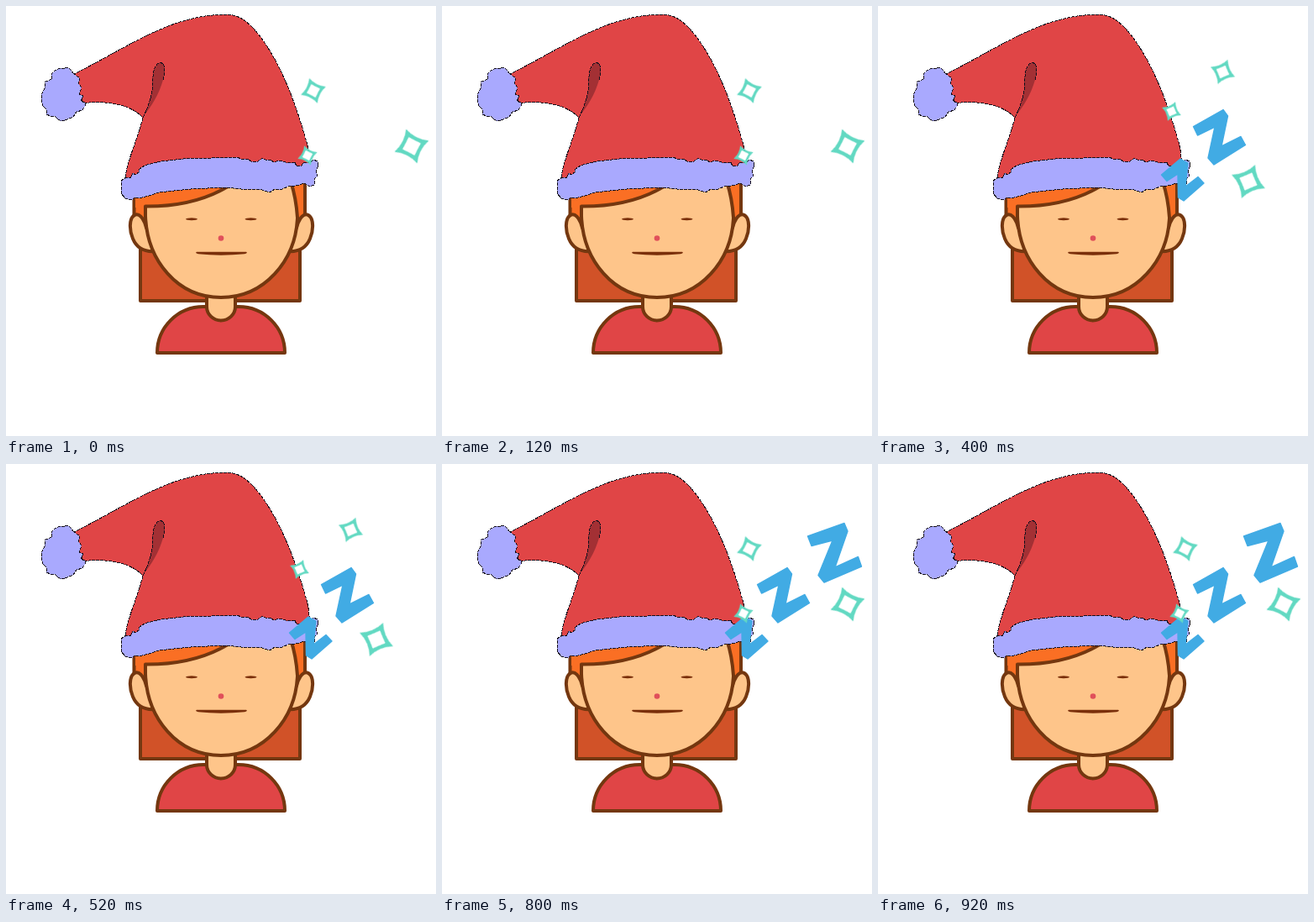
These frames come from a looping animation (512 px wide and 512 px high, 1000 ms). An HTML page:

```html
<!DOCTYPE html>
<html lang="en">
<head>
<meta charset="utf-8">
<title>Sleepy winter nap</title>
<style>
  html, body { margin: 0; width: 100%; height: 100%; overflow: hidden; background: #fff; }
  svg { display: block; width: 100vw; height: 100vh; }

  .line { stroke: #74370f; stroke-width: 4; stroke-linejoin: round; stroke-linecap: round; }
  .edge { stroke: #15101c; stroke-width: 1; stroke-dasharray: 4 1; shape-rendering: crispEdges; }
  .skin { fill: #fec58a; }
  .hair { fill: #fa6f24; }
  .back { fill: #d15228; }
  .red  { fill: #e04546; }
  .fur  { fill: #a9a9fe; }
  .dark { fill: #7a2f0a; }

  .z { fill: #41abe4; stroke: #41abe4; stroke-width: 1.4; stroke-linejoin: round; animation: 1s step-end infinite; }
  .z1 { animation-name: first; }
  .z2 { animation-name: second; }
  .z3 { animation-name: third; }
  @keyframes first  { 0% { opacity: 0 } 20%, 100% { opacity: 1 } }
  @keyframes second { 0% { opacity: 0 } 40%, 100% { opacity: 1 } }
  @keyframes third  { 0% { opacity: 0 } 60%, 100% { opacity: 1 } }

  /* each star swings between three poses: a, b, c, b, a */
  .star { animation: swing 1s step-end infinite; }
  .big   { --a: 483px, 167px; --b: 469px, 189px; --c: 441px, 209px; --s: 1; }
  .mid   { --a: 366px, 101px; --b: 383px, 86.5px; --c: 410.5px, 78.5px; --s: .73; }
  .small { --a: 359px, 178px; --b: 349px, 156.5px; --c: 349.5px, 125.5px; --s: .57; }
  @keyframes swing {
    0%, 80%, 100% { transform: translate(var(--a)) rotate(-18deg) scale(var(--s)); }
    20%, 60%      { transform: translate(var(--b)) scale(var(--s)); }
    40%           { transform: translate(var(--c)) rotate(22deg) scale(var(--s)); }
  }
</style>
</head>
<body>
<svg viewBox="0 0 512 512" fill="none">
  <defs>
    <g id="star">
      <path fill="#62d9c2" d="M0-21.500Q6.500-6.500 21.500 0Q6.500 6.500 0 21.500Q-6.500 6.500-21.500 0Q-6.500-6.500 0-21.500Z"/>
      <path fill="#fff" d="M0-11.500Q5.500-5.500 11.500 0Q5.500 5.500 0 11.500Q-5.500 5.500-11.500 0Q-5.500-5.500 0-11.500Z"/>
    </g>
  </defs>

  <!-- body -->
  <path class="line back" d="M160 270H350V351H160Z"/>
  <path class="line red" d="M180 413A55 55 0 0 1 235 358H277A55 55 0 0 1 332 413Z"/>
  <path class="line skin" d="M239 340V358A17 16.500 0 0 0 273 358V340Z"/>

  <!-- head -->
  <path class="line hair" d="M152.500 210V262H172V210Z"/>
  <path class="line hair" d="M338 205H356V262H338Z"/>
  <path class="line skin" d="M167 264C164 252 158 246 153 249C146 253 147 268 151 277C156 289 166 293 178 292"/>
  <path class="line skin" d="M346 264C349 252 355 246 360 249C367 253 366 268 362 277C357 289 347 293 335 292"/>
  <path class="line skin" d="M166 238V250C168 303 204 347 256 347C308 347 345 303 347 252C346 237 344 224 339 209L262 205Z"/>
  <path class="hair" d="M154 208H264V215Q224 239 166 238.500V240H154Z"/>
  <path class="line" d="M166 250V238.500Q224 239 264 215"/>
  <ellipse class="dark" cx="221" cy="253.700" rx="7" ry="1.500"/>
  <ellipse class="dark" cx="291.500" cy="253.700" rx="7" ry="1.500"/>
  <circle fill="#e0505a" cx="256" cy="276.500" r="3.300"/>
  <path class="dark" d="M227 292.700H286Q288.500 294 284 295.300Q256 298 229 295.300Q224.500 294 227 292.700Z"/>

  <!-- hat -->
  <path class="edge red" d="M80 81.500C112 66 145 45 181 29C208 17 238 9 267 10.500C285 12 301 32 314 53C335 88 347 125 355 152C360 168 362 178 361 194L250 205L142 206C143 187 155 164 163 133C151 120 128 112 93 115.500L82 100Z"/>
  <path fill="#a33034" d="M164 131C173 113 175 99 175 84C176 73 179 68 184 67.500C190 68 189.500 79 187 88C182 106 172 121 164 131Z"/>
  <path class="edge" d="M163 133C173 113 175 99 175 84C176 73 179 68 184 67.500C190 68 189.500 79 187 88"/>
  <path class="edge fur" d="M81 81L77 76L73 73L68 75L64 74L58 77L54 81L55 87L47 90L46 98L42 106L42 112L44 119L48 123L48 129L53 131L58 131L62 135L66 137L73 135L80 132L84 126L91 124L94 119L94 115L89 113L92 107L87 105L90 97L86 92L88 86Z"/>
  <path class="edge fur" d="M137 208L143 204L148 205L151 199L154 201L158 198L159 194L165 190L175 187L185 185L202 183L220 181L245 181L275 180L280 182L288 182L292 185L300 185L305 181L309 183L316 183L318 186L326 184L336 187L344 186L346 191L352 190L354 186L361 187L366 183L371 185L372 190L369 197L371 202L367 206L367 213L361 215L356 211L345 214L338 214L327 219L320 218L314 222L305 219L295 218L280 218L262 216L240 217L220 218L200 220L182 222L170 226L158 229L153 228L150 231L142 229L137 223L138 215Z"/>

  <path class="z z1" d="M337.500 201L360 182L369 187L366 215L381 203.500L388 211L364 232L357.500 228L357 200L344 208.500Z"/>
  <path class="z z2" d="M375.500 143.500L411 123.500L416.500 131L409 167L432 155.500L437.500 165.500L400 189L393 181L401 144L380.500 154Z"/>
  <path class="z z3" d="M435.500 86L479 70.500L483 80L468 123L495.500 110.500L499.500 122L455 141L448 132.500L465 91L440 97.500Z"/>

  <use class="star big" href="#star"/>
  <use class="star mid" href="#star"/>
  <use class="star small" href="#star"/>
</svg>
</body>
</html>
```
